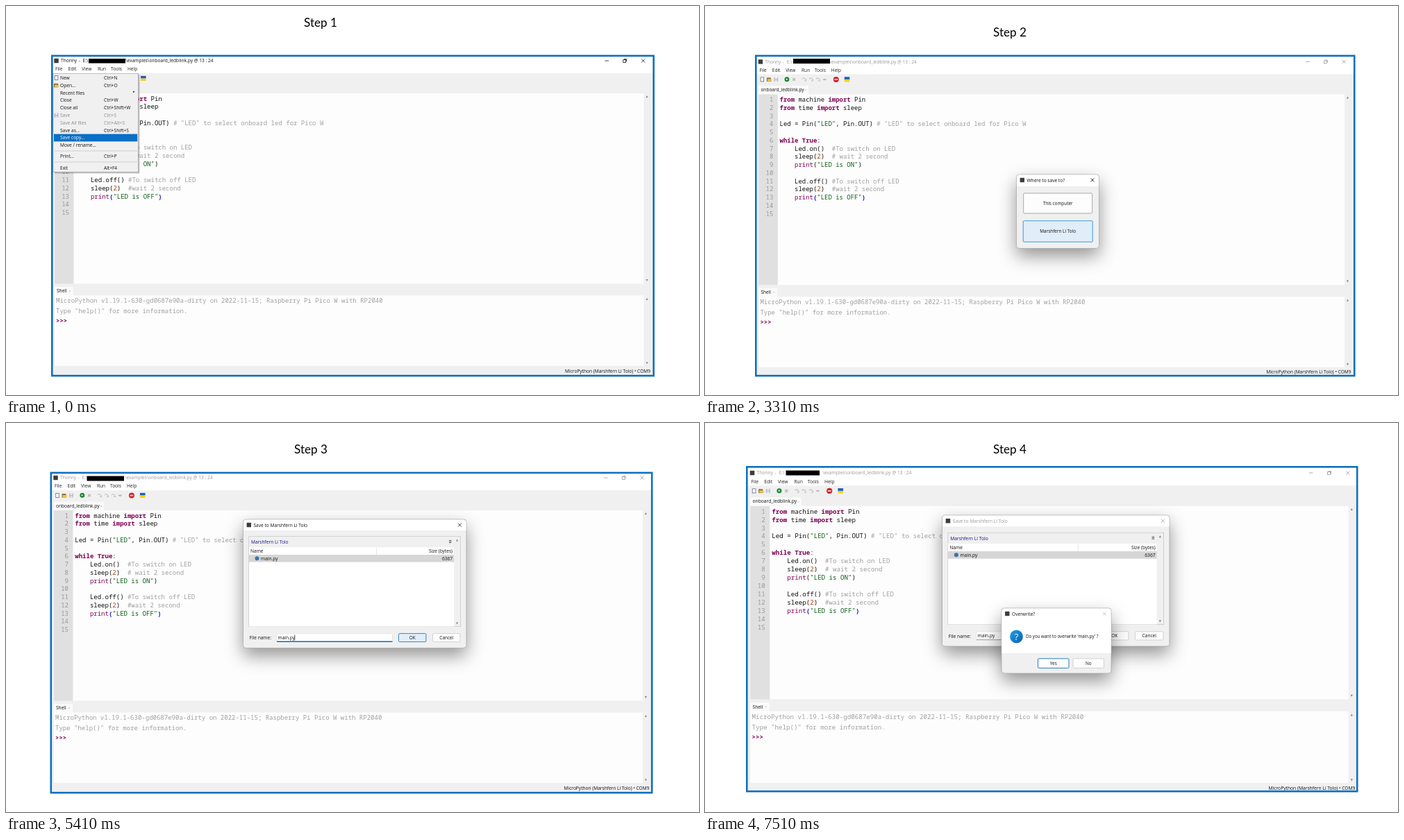
Animation of 998x561 px, one loop 8350 ms. Source, as an HTML page with a canvas:

```html
<!DOCTYPE html>
<html lang="en">
<head>
<meta charset="utf-8">
<title>Saving a script to the board</title>
<style>
html, body { margin: 0; width: 100%; height: 100%; overflow: hidden; background: #fff; }
canvas { display: block; width: 998px; height: 561px; }
</style>
</head>
<body>
<canvas id="stage" width="998" height="561"></canvas>
<script>
const ctx = document.getElementById('stage').getContext('2d');
const UI = '"Open Sans", "Noto Sans", sans-serif';
const MONO = '"Noto Sans Mono", "DejaVu Sans Mono", monospace';
const UI_SIZE = 6.6, MONO_SIZE = 9.023;
const BLUE = '#1070bf', FACE = '#f0f0f0', PAPER = '#fdfdfd', GREY = '#a0a0a0';
const BOARD = 'Marshfern Li Tolo';

const CODE = `from machine import Pin
from time import sleep

Led = Pin("LED", Pin.OUT) # "LED" to select onboard led for Pico W

while True:
    Led.on()  #To switch on LED
    sleep(2)  # wait 2 second
    print("LED is ON")

    Led.off() #To switch off LED
    sleep(2)  #wait 2 second
    print("LED is OFF")

`.split('\n');

// Each step: duration, heading position, frame box, window transform, redaction bar
const STEPS = [
  { ms: 2050, head: [429, 24], box: [65, 70.5, 934, 534.5], at: [0, 0, 1, 1], bar: [119, 76, 53, 6.5] },
  { ms: 2100, head: [415, 38], box: [72, 70.5, 936.5, 534.5], at: [7.4, 1.4, .9942, 1.001], bar: [127, 76, 53, 7] },
  { ms: 2100, head: [415, 38], box: [63.5, 70.5, 931.5, 534.5], at: [-1, 0, .9993, 1], bar: [116.5, 76.5, 53.5, 7] },
  { ms: 2100, head: [415, 38], box: [59, 62, 940.5, 532.5], at: [-5.6, -8.2, 1.015, 1.0156], bar: [116.5, 68.5, 48.5, 7] }
];
const LOOP = STEPS.reduce((sum, s) => sum + s.ms, 0);

function rect(x0, y0, x1, y1, fill) {
  ctx.fillStyle = fill;
  ctx.fillRect(x0, y0, x1 - x0, y1 - y0);
}

function text(str, x, y, color = '#111', align = 'left', size = UI_SIZE, family = UI, weight = '') {
  ctx.font = `${weight} ${size}px ${family}`;
  ctx.textAlign = align;
  ctx.fillStyle = color;
  ctx.fillText(str, x, y + size * .35);
}

function line(points, color, width = .8) {
  ctx.beginPath();
  points.forEach(([x, y]) => ctx.lineTo(x, y));
  ctx.strokeStyle = color;
  ctx.lineWidth = width;
  ctx.stroke();
}

function dot(x, y, r, fill) {
  ctx.beginPath();
  ctx.arc(x, y, r, 0, Math.PI * 2);
  ctx.fillStyle = fill;
  ctx.fill();
}

function tri(x, y, dx, dy, fill) {
  ctx.beginPath();
  ctx.moveTo(x + dx, y + dy);
  ctx.lineTo(x - dx + dy, y - dy + dx);
  ctx.lineTo(x - dx - dy, y - dy - dx);
  ctx.fillStyle = fill;
  ctx.fill();
}

function cross(x, y, r, color, width) {
  line([[x - r, y - r], [x + r, y + r]], color, width);
  line([[x - r, y + r], [x + r, y - r]], color, width);
}

function scrollArrows(x, top, bottom) {
  tri(x, top, 0, -1.6, '#888');
  tri(x, bottom, 0, 1.6, '#888');
}

function appIcon(x, y) {
  rect(x - 3.2, y - 3.2, x + 3.2, y + 3.2, '#3c3c3c');
}

function roundBox(x0, y0, x1, y1, r, fill, stroke, width = .8) {
  ctx.beginPath();
  ctx.roundRect(x0, y0, x1 - x0, y1 - y0, r);
  ctx.fillStyle = fill;
  ctx.fill();
  if (!stroke) return;
  ctx.strokeStyle = stroke;
  ctx.lineWidth = width;
  ctx.stroke();
}

function button(label, x0, y0, x1, y1, fill = '#fdfdfd', stroke = '#d2d2d2') {
  roundBox(x0, y0, x1, y1, 1.2, fill, stroke, 1);
  text(label, (x0 + x1) / 2, (y0 + y1) / 2, '#111', 'center', 6.4);
}

function newIcon(x, y) {
  ctx.strokeStyle = '#66708c';
  ctx.lineWidth = .8;
  rect(x - 2.3, y - 3, x + 2.3, y + 3, '#fff');
  ctx.strokeRect(x - 2.3, y - 3, 4.6, 6);
}

function openIcon(x, y) {
  rect(x - 3.5, y - 2.5, x + 2.5, y + 3, '#8a6d2a');
  rect(x - 2.5, y - .6, x + 3.8, y + 2.6, '#f0c44c');
}

function saveIcon(x, y, color) {
  rect(x - 3, y - 3, x + 3, y + 3, color);
  rect(x - 1.6, y - 3, x + 1.6, y - .6, '#eee');
  rect(x - 1.8, y + .8, x + 1.8, y + 3, '#e4e4e4');
}

function toolbar() {
  newIcon(75, 104.5);
  openIcon(85, 104.5);
  saveIcon(95, 104.5, '#b9bcc4');
  dot(110.8, 104.3, 3.5, '#1d8b35');
  tri(111, 104.3, 1.3, 0, '#fff');
  dot(121, 104.5, 2, '#bbb');
  cross(121, 104.5, 2.6, '#c4c4c4', .7);
  for (const x of [136, 146, 156]) {
    line([[x - 3, 104], [x - 1, 102.5], [x + 2, 104], [x + 2.5, 106.5]], '#bbb', 1);
    line([[x, 106.5], [x + 3, 106.5]], '#bbb', 1);
  }
  line([[163, 104.5], [167, 104.5]], '#bbb', 1.8);
  tri(167, 104.5, 1.6, 0, '#bbb');
  dot(182, 104.5, 4, '#d3232e');
  rect(179.6, 103.6, 184.4, 105.4, '#f6c9cb');
  rect(194, 100.8, 201.6, 104.5, '#1c5fc0');
  rect(194, 104.5, 201.6, 108, '#f5d21a');
}

function codeLine(src, x, y) {
  const tokens = /(#.*)|("[^"]*")|\b(from|import|while|True)\b|\b(print)\b|\b(\d+)\b|\w+|[^\w"#]/g;
  const lastPrint = src.includes('OFF"');
  for (const m of src.matchAll(tokens)) {
    const [tok, comment, str, keyword, builtin, num] = m;
    const paren = lastPrint && /[()]/.test(tok);
    const color = comment ? GREY : str ? '#0a5c14' : keyword || builtin ? '#7f0055'
      : num ? '#b04600' : paren ? '#1414d8' : '#111';
    text(tok, x, y, color, 'left', MONO_SIZE, MONO, keyword || paren ? 'bold' : '');
    x += ctx.measureText(tok).width;
  }
}

function ideWindow(active) {
  const ink = active ? '#111' : '#999';
  rect(40, 60, 960, 97, '#fff');
  rect(40, 97, 960, 560, FACE);

  appIcon(72.5, 79);
  text('Thonny', 79, 79, ink);
  text('-', 104.5, 79, ink);
  text('E:\\', 110.5, 79, ink);
  text('\\examples\\onboard_ledblink.py @ 13 : 24', 172.2, 79, ink);
  line([[862.5, 79], [868, 79]], ink);
  ctx.strokeStyle = ink;
  ctx.strokeRect(888.8, 77.6, 3.8, 3.8);
  line([[890, 76.6], [893.7, 76.6], [893.7, 80.2]], ink);
  cross(917.6, 79, 2.5, ink);

  const menus = { File: 71, Edit: 89.5, View: 109, Run: 132, Tools: 151, Help: 175 };
  for (const name in menus) text(name, menus[name], 91, '#222');
  toolbar();

  rect(69.5, 113.5, 142, 126, '#fafafa');
  text('onboard_ledblink.py', 73, 119.5);
  cross(138, 120, 1, '#bbb', .6);

  rect(70, 126, 97.6, 400.5, '#e0e0e0');
  rect(97.6, 126, 918.5, 400.5, PAPER);
  scrollArrows(923, 130.5, 395.5);
  CODE.forEach((src, i) => {
    const y = 133.6 + i * 11.74;
    text(i + 1, 91, y, '#999', 'right', MONO_SIZE, MONO);
    codeLine(src, 100.3, y);
  });

  rect(69.5, 405, 97, 418, '#fafafa');
  text('Shell', 73, 411);
  cross(92, 411, 1, '#bbb', .6);
  rect(70, 417.5, 918.5, 519, PAPER);
  scrollArrows(923, 422.5, 515);
  const mono = (s, y, color, weight) => text(s, 72, y, color, 'left', MONO_SIZE, MONO, weight);
  mono('MicroPython v1.19.1-630-gd0687e90a-dirty on 2022-11-15; Raspberry Pi Pico W with RP2040', 425, GREY);
  mono('Type "help()" for more information.', 440, GREY);
  mono('>>>', 454, '#7f0055', 'bold');
  text(`MicroPython (${BOARD}) • COM9`, 928, 526.3, '#111', 'right');
}

function fileMenu() {
  const items = [
    ['New', 'Ctrl+N', 103.5], ['Open...', 'Ctrl+O', 114.3], ['Recent files', '', 125.2],
    ['Close', 'Ctrl+W', 136], ['Close all', 'Ctrl+Shift+W', 146.8], ['Save', 'Ctrl+S', 157.6],
    ['Save All files', 'Ctrl+Alt+S', 168.4], ['Save as...', 'Ctrl+Shift+S', 179.2],
    ['Save copy...', '', 190], ['Move / rename...', '', 200.8], ['Print...', 'Ctrl+P', 217],
    ['Exit', 'Alt+F4', 233.2]
  ];
  rect(70, 99, 192.5, 241.5, 'rgba(0,0,0,.22)');
  rect(67.5, 97, 191, 240, '#9c9c9c');
  rect(68.2, 97.6, 190.2, 239.2, FACE);
  for (const [label, keys, y] of items) {
    const chosen = label === 'Save copy...';
    const off = label === 'Save' || label === 'Save All files';
    if (chosen) rect(69, y - 5.4, 189.2, y + 5.4, '#0a6fc6');
    const color = chosen ? '#fff' : off ? '#8c8c8c' : '#111';
    text(label, 78, y, color);
    text(keys, 141, y, color);
  }
  newIcon(72.5, 103.5);
  openIcon(72.5, 114.3);
  saveIcon(72.5, 157.6, '#a9b4c6');
  tri(184.3, 123.8, 1.2, 0, '#111');
  for (const y of [209, 225]) line([[70, y], [189, y]], '#c6c6c6');
}

function dialog(x0, y0, x1, y1, split, title, ink) {
  ctx.save();
  ctx.shadowColor = 'rgba(0,0,0,.42)';
  ctx.shadowBlur = 26;
  ctx.shadowOffsetY = 11;
  roundBox(x0, y0, x1, y1, 4, FACE);
  ctx.restore();
  roundBox(x0, y0, x1, y1, 4, FACE, '#a9a9a9', .8);
  roundBox(x0 + .4, y0 + .4, x1 - .4, split, [4, 4, 0, 0], '#fff');
  appIcon(x0 + 8.3, y0 + 8);
  text(title, x0 + 15, y0 + 8.2, ink);
  cross(x1 - 9.5, y0 + 8, 2.5, ink);
}

function targetDialog() {
  dialog(448.5, 243, 567.5, 349.5, 260, 'Where to save to?', '#111');
  button('This computer', 458.7, 270, 557.7, 299, '#fdfdfd', '#a8a8a8');
  button(BOARD, 458.2, 309.8, 558.2, 340.2, '#e0eef9', '#3c97d6');
}

function saveDialog(active) {
  dialog(341.5, 139, 663, 324.5, 155, `Save to ${BOARD}`, active ? '#111' : '#999');
  rect(349.5, 163.5, 655, 294, '#b5b5b5');
  rect(350, 164, 654.5, 293.5, FACE);
  rect(350, 179.3, 645, 293.5, '#fff');
  text(BOARD, 353, 172, '#14148c');
  for (const y of [169.4, 171, 172.6]) line([[638, y], [641.5, y]], '#333', .7);
  text('Name', 352, 185);
  text('Size (bytes)', 643, 185, '#111', 'right');
  line([[533.5, 180], [533.5, 190]], '#ddd');
  rect(350, 190, 645, 200.5, '#d6d6d6');
  dot(361.5, 195.2, 3, '#3b75ab');
  text('main.py', 367, 195.3);
  text('6367', 643, 195.3, '#111', 'right');
  scrollArrows(649.6, 169, 289);

  text('File name:', 350.5, 310);
  roundBox(390, 303.8, 556.5, 315.6, 1, '#fff', '#e0e0e0', .7);
  line([[390, 315.3], [556.5, 315.3]], active ? '#0a6cbd' : '#8c8c8c', active ? 1.4 : .8);
  text('main.py', 391.5, 309.5);
  if (active) line([[415.8, 305.5], [415.8, 313.5]], '#111', .7);
  button('OK', 565.5, 303.6, 605, 315.6, active ? '#e0eef9' : '#fdfdfd', active ? '#3c87c0' : '#d2d2d2');
  button('Cancel', 614.5, 303.6, 654, 315.6);
}

function overwriteDialog() {
  dialog(427, 267, 585, 361, 332, 'Overwrite?', '#111');
  rect(571, 271, 580, 279, '#fff');
  cross(575.3, 275, 2.5, '#bbb');
  const shade = ctx.createLinearGradient(440, 299, 456, 317);
  shade.addColorStop(0, '#1ba0e2');
  shade.addColorStop(1, '#0a62b5');
  dot(448.5, 308, 9.4, shade);
  text('?', 448.5, 308, '#fff', 'center', 13);
  text("Do you want to overwrite 'main.py' ?", 462, 308, '#111', 'left', 6.2);
  button('Yes', 479.5, 339.8, 524, 353.4, '#fdfdfd', '#2a80c0');
  button('No', 530, 339.8, 574.5, 353.4);
}

function draw(index) {
  const { head, box: [x0, y0, x1, y1], at: [dx, dy, sx, sy], bar } = STEPS[index];
  rect(0, 0, 998, 561, '#fff');
  text(`Step ${index + 1}`, head[0], head[1], '#000', 'left', 17.1, 'Lato, "Open Sans", sans-serif');

  ctx.save();
  ctx.beginPath();
  ctx.rect(x0, y0, x1 - x0, y1 - y0);
  ctx.clip();
  // Scale about the window's title corner
  ctx.translate(72 + dx, 79 + dy + (index === 3 ? 1.2 : 0));
  ctx.scale(sx, sy);
  ctx.translate(-72, -79);
  if (index === 3) ctx.translate(1.1, 0);
  ideWindow(index === 0);
  if (index === 0) fileMenu();
  ctx.restore();

  ctx.fillStyle = '#000';
  ctx.fillRect(...bar);
  ctx.strokeStyle = BLUE;
  ctx.lineWidth = 2.6;
  ctx.strokeRect(x0 + 1.3, y0 + 1.3, x1 - x0 - 2.6, y1 - y0 - 2.6);

  if (index === 1) targetDialog();
  if (index === 2) saveDialog(true);
  if (index === 3) {
    ctx.save();
    ctx.translate(341.5, 133);
    ctx.scale(1.0187, 1.0187);
    ctx.translate(-341.5, -139);
    saveDialog(false);
    ctx.restore();
    overwriteDialog();
  }
}

let shown = -1;
const start = performance.now();
function tick() {
  let t = (performance.now() - start) % LOOP, index = 0;
  while (t >= STEPS[index].ms) t -= STEPS[index++].ms;
  if (index !== shown) draw(shown = index);
  requestAnimationFrame(tick);
}
tick();
</script>
</body>
</html>
```
